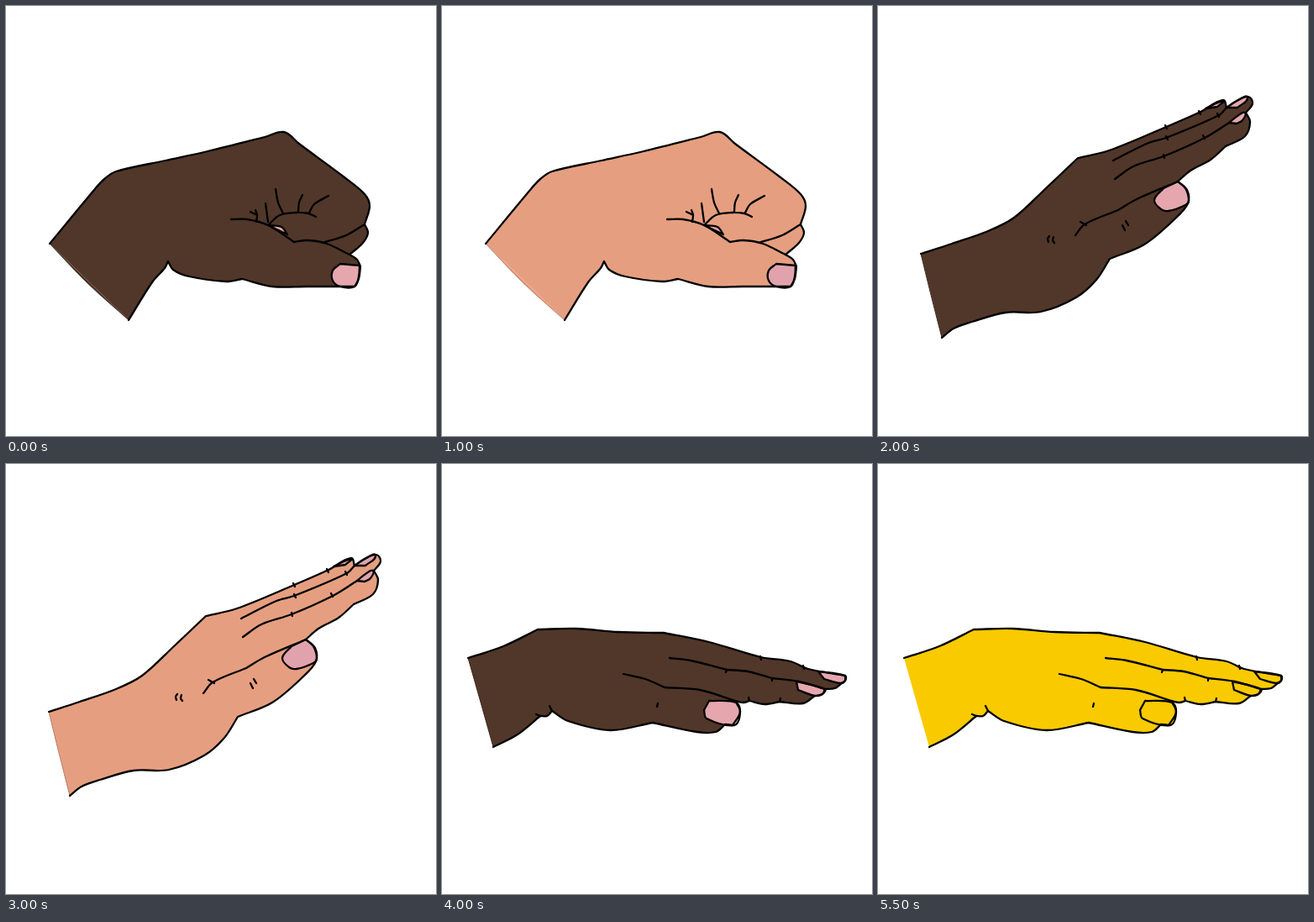
An HTML page with a canvas that plays this animation: 512 by 512 pixels, repeating every 6 s.

```html
<!DOCTYPE html>
<html lang="en">
<head>
<meta charset="utf-8">
<title>Hands</title>
<style>
html, body { margin: 0; width: 100%; height: 100%; overflow: hidden; background: #fff; }
canvas { display: block; width: 100vmin; height: 100vmin; }
</style>
</head>
<body>
<canvas id="stage" width="512" height="512"></canvas>
<script>
const ctx = document.getElementById('stage').getContext('2d');
const STEP = 500;

const tones = [
  { skin: '#513729', nail: '#e5a7ad', edge: '#3a2018' },
  { skin: '#a66a4a', nail: '#e3a5ad', edge: '#6b4030' },
  { skin: '#e59f80', nail: '#e0a3ad', edge: '#ad7058' },
  { skin: '#f9ca00', nail: '#f9ca00', edge: null }
];

const pairs = flat => flat.flatMap((x, i) => i % 2 ? [] : [[x, flat[i + 1]]]);

function direction(a, b) {
  const dx = b[0] - a[0], dy = b[1] - a[1], len = Math.hypot(dx, dy) || 1;
  return [dx / len, dy / len];
}

// Smooth curve through all points, with handles a third of each chord.
function spline(path, pts) {
  const slope = i => direction(pts[Math.max(i - 1, 0)], pts[Math.min(i + 1, pts.length - 1)]);
  for (let i = 0; i < pts.length - 1; i++) {
    const a = pts[i], b = pts[i + 1], s = slope(i), e = slope(i + 1);
    const k = Math.hypot(b[0] - a[0], b[1] - a[1]) / 3;
    path.bezierCurveTo(a[0] + s[0] * k, a[1] + s[1] * k,
      b[0] - e[0] * k, b[1] - e[1] * k, b[0], b[1]);
  }
}

class Hand {
  constructor(x, y) {
    this.first = this.last = [x, y];
    this.outline = new Path2D();
    this.outline.moveTo(x, y);
    this.wrist = new Path2D();
    this.lines = new Path2D();
    this.nails = new Path2D();
  }
  // Edges follow one another and meet in corners.
  edge(...flat) {
    const pts = [this.last, ...pairs(flat)];
    spline(this.outline, pts);
    this.last = pts[pts.length - 1];
    return this;
  }
  cut(x, y) {
    this.wrist.moveTo(...this.last);
    spline(this.wrist, [this.last, [x, y], this.first]);
    return this;
  }
  line(...flat) {
    const pts = pairs(flat);
    this.lines.moveTo(...pts[0]);
    spline(this.lines, pts);
    return this;
  }
  tick(x, y, dx = 2, dy = 4) {
    return this.line(x, y, x + dx, y + dy);
  }
  nail(...flat) {
    const pts = pairs(flat);
    this.nails.moveTo(...pts[0]);
    spline(this.nails, pts);
    this.nails.closePath();
    return this;
  }
}

function makeFist() {
  return new Hand(52, 283)
    .edge(105, 219, 117, 206, 131, 197, 190, 184, 240, 173, 308, 156, 331, 150,
      349, 164, 403, 204, 427, 224, 433, 238, 427, 260)
    .edge(431, 270, 425, 282, 409, 296)
    .edge(418, 302, 422, 310)
    .edge(420, 325, 415, 334)
    .edge(358, 334)
    .edge(317, 334, 281, 325)
    .edge(262, 328, 218, 322, 199, 314, 193, 304)
    .edge(189, 312, 174, 329, 146, 374)
    .cut(97, 330)
    .line(268, 254, 287, 254, 312, 261, 343, 281)
    .line(343, 281, 359, 279, 382, 283, 409, 296)
    .line(377, 282, 405, 273, 427, 260)
    .line(312, 261, 326, 249, 345, 246, 360, 247, 369, 251)
    .line(321, 218, 324, 234, 330, 247)
    .line(353, 225, 349, 234, 348, 245)
    .line(384, 226, 367, 236, 361, 246)
    .line(309, 235, 312, 257)
    .tick(291, 245, 8, 4)
    .line(297, 243, 299, 249, 298, 257)
    .nail(421, 309, 420, 322, 415, 334, 398, 334, 389, 327, 389, 315, 398, 307)
    .nail(312, 261, 328, 263, 335, 272);
}

function makeRaised() {
  return new Hand(51, 295)
    .edge(88, 283, 131, 268, 162, 252, 200, 217, 238, 181)
    .edge(275, 172, 343, 144, 384, 126, 411, 112, 415, 121)
    .edge(429, 112, 441, 108, 446, 116, 438, 127)
    .edge(443, 138, 437, 155, 414, 167)
    .edge(396, 183, 372, 196, 357, 209)
    .edge(368, 219, 369, 235, 353, 254, 317, 284, 276, 301)
    .edge(260, 326, 236, 347, 194, 364, 152, 365, 112, 376, 90, 384, 76, 395)
    .cut(62, 340)
    .line(280, 184, 322, 163, 343, 157, 406, 130, 415, 121)
    .line(282, 206, 304, 191, 340, 179, 389, 157, 418, 139)
    .line(235, 273, 246, 260, 286, 243)
    .line(286, 243, 308, 230, 357, 209)
    .tick(241, 257, 7, 4)
    .line(204, 274, 202, 277, 203, 281)
    .line(209, 275, 208, 279, 210, 282)
    .tick(291, 261, 3, 6)
    .tick(295, 256, 3, 5)
    .tick(342, 142)
    .tick(382, 125)
    .tick(343, 155)
    .tick(404, 128)
    .tick(387, 154)
    .tick(340, 177, 1)
    .nail(357, 209, 366, 217, 370, 232, 366, 237, 346, 244, 337, 242, 329, 231, 340, 217)
    .nail(418, 139, 428, 131, 437, 127, 434, 136, 427, 140)
    .nail(415, 121, 427, 113, 440, 109, 428, 121)
    .nail(390, 122, 411, 113, 404, 120);
}

function makeFlat() {
  return new Hand(31, 231)
    .edge(73, 217, 114, 197)
    .edge(160, 196, 210, 200, 264, 201)
    .edge(318, 212, 380, 230, 415, 235, 436, 244, 480, 252)
    .edge(480, 258, 476, 261)
    .edge(468, 267, 456, 268)
    .edge(453, 274, 444, 276)
    .edge(430, 285, 402, 283)
    .edge(384, 286, 366, 282)
    .edge(359, 284, 349, 282)
    .edge(355, 295, 346, 311)
    .edge(337, 310)
    .edge(326, 319, 303, 319, 251, 308)
    .edge(200, 317, 150, 306, 131, 294)
    .edge(125, 300, 117, 300)
    .edge(90, 322, 61, 337)
    .cut(47, 287)
    .line(131, 294, 128, 288)
    .tick(112, 298, 5, 2)
    .line(216, 250, 242, 256, 265, 266)
    .line(265, 266, 307, 269, 349, 282)
    .line(271, 231, 296, 234, 339, 245)
    .line(339, 245, 364, 247, 393, 255)
    .line(393, 255, 425, 259, 456, 268)
    .tick(338, 248, 1, -3)
    .tick(393, 258, 0, -3)
    .tick(365, 278, 1)
    .tick(403, 279, -1)
    .tick(379, 229, 1)
    .tick(430, 240, 1)
    .tick(257, 285, -1)
    .nail(318, 282, 350, 284, 355, 296, 348, 311, 315, 303, 312, 293)
    .nail(422, 259, 456, 268, 453, 274, 444, 276, 424, 269)
    .nail(448, 247, 480, 252, 480, 258, 474, 261, 455, 256);
}

const hands = [makeFist(), makeRaised(), makeFlat()];

function stroke(path, color, width) {
  ctx.strokeStyle = color;
  ctx.lineWidth = width;
  ctx.stroke(path);
}

function fill(path, color) {
  ctx.fillStyle = color;
  ctx.fill(path);
}

function drawHand(hand, tone) {
  ctx.clearRect(0, 0, 512, 512);
  ctx.lineCap = ctx.lineJoin = 'round';
  fill(hand.outline, tone.skin);
  fill(hand.wrist, tone.skin);
  if (tone.edge) stroke(hand.wrist, tone.edge, 0.9);
  fill(hand.nails, tone.nail);
  for (const part of ['outline', 'lines', 'nails']) stroke(hand[part], '#000', 2.3);
}

const start = performance.now();

function frame() {
  const step = Math.floor((performance.now() - start) / STEP) % (hands.length * tones.length);
  drawHand(hands[Math.floor(step / tones.length)], tones[step % tones.length]);
  requestAnimationFrame(frame);
}
frame();
</script>
</body>
</html>
```
